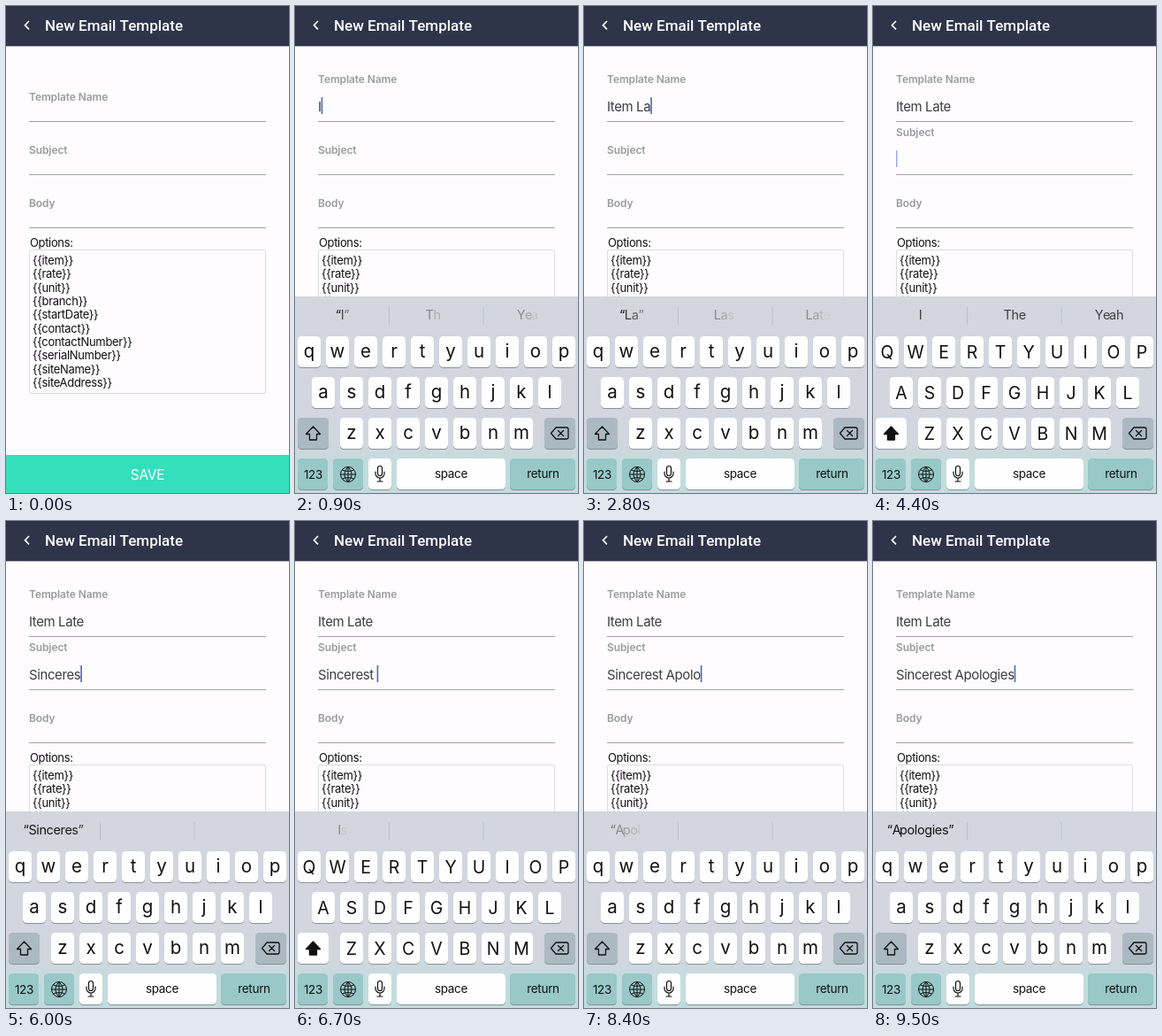
Recreate the animation shown at these times as an HTML page with a canvas. Size 320x550 px, loop 9600 ms.

```html
<!DOCTYPE html>
<html lang="en">
<head>
<meta charset="utf-8">
<title>New Email Template</title>
<style>
  html, body { margin: 0; width: 320px; height: 550px; overflow: hidden; background: #fefcfe; }
  canvas { display: block; width: 320px; height: 550px; }
</style>
</head>
<body>
<canvas id="stage"></canvas>
<script>
const LOOP = 9600, STEP = 100, KEYBOARD_TOP = 328;
const canvas = document.getElementById('stage');
const ctx = canvas.getContext('2d');
const ratio = window.devicePixelRatio || 1;
canvas.width = 320 * ratio;
canvas.height = 550 * ratio;

const fields = [
  { label: 'Template Name', y: 130, focus: 200, text: 'Item Late',
    keys: [800, 1100, 1400, 1770, 2000, 2500, 2700, 2900, 3200] },
  { label: 'Subject', y: 190, focus: 3900, text: 'Sincerest Apologies',
    keys: [4600, 4800, 5000, 5200, 5300, 5500, 5600, 5800, 6200, 6700,
           7410, 7800, 8000, 8200, 8400, 8600, 8700, 8900, 9100] },
  { label: 'Body', y: 250, focus: Infinity, text: '', keys: [] }
];
const options = ['item', 'rate', 'unit', 'branch', 'startDate', 'contact',
  'contactNumber', 'serialNumber', 'siteName', 'siteAddress'];
const suggestions = {
  I: ['The', 'Yeah'], It: ['Its', 'Item'], Ite: ['Item', 'Items'], Item: ['Items', 'Itemised'],
  L: ['Love', 'Like'], La: ['Last', 'Later'], Lat: ['Late', 'Later'], Late: ['Later', 'Latest'],
  S: ['So', 'See'], Si: ['Since', 'Six'], Sin: ['Since', 'Sing'], Sinc: ['Since', 'Sincere'],
  Since: ['Sincere', 'Sincerely'], A: ['And', 'You'], Ap: ['App', 'Apr']
};
const rows = [['qwertyuiop', 16, 373], ['asdfghjkl', 32, 419], ['zxcvbnm', 64, 465]];

const clamp = v => Math.max(0, Math.min(1, v));
const easeOut = v => 1 - (1 - clamp(v)) ** 3;

function setFont(size, { weight = 400, family = 'Inter', spacing = -0.4, caps = '' } = {}) {
  ctx.font = `${caps} ${weight} ${size}px ${family}, sans-serif`;
  ctx.letterSpacing = spacing + 'px';
}

function write(str, x, y, size, color, style = {}) {
  setFont(size, style);
  ctx.textAlign = style.align || 'left';
  ctx.fillStyle = color;
  ctx.fillText(str, x, y);
}

function rect(x, y, w, h, color) {
  ctx.fillStyle = color;
  ctx.fillRect(x, y, w, h);
}

function rounded(x, y, w, h, r, color) {
  ctx.beginPath();
  ctx.roundRect(x, y, w, h, r);
  ctx.fillStyle = color;
  ctx.fill();
}

function icon(path, width, fill) {
  const shape = new Path2D(path);
  ctx.strokeStyle = ctx.fillStyle = '#111';
  ctx.lineWidth = width;
  ctx.lineJoin = ctx.lineCap = 'round';
  if (fill) ctx.fill(shape);
  ctx.stroke(shape);
}

function key(x, y, w, color) {
  rounded(x, y + 1, w, 35, 4.5, '#8b9097');
  rounded(x, y, w, 35, 4.5, color);
}

function drawHeader() {
  rect(0, 0, 320, 45, '#2e344a');
  rect(0, 45, 320, 1, '#a9abb5');
  ctx.strokeStyle = '#fff';
  ctx.lineWidth = 1.7;
  ctx.lineCap = 'butt';
  ctx.stroke(new Path2D('M26 17 L21.5 21.7 L26 26.4'));
  write('New Email Template', 44, 28, 17, '#fff', { weight: 500, family: 'Roboto', spacing: 0 });
}

function drawField(field, t, active, typed, idle) {
  const lift = 20 * easeOut((t - field.focus) / 250);
  write(field.label, 26, field.y - 23 - lift, 12, '#9a9a9c', { weight: 600, spacing: -0.1 });
  rect(26, field.y, 268, 1, '#a3a3a5');
  write(typed, 26, field.y - 11, 15, '#3d3d3f');
  if (!active) return;
  const blink = idle < 400 ? 1 : clamp(0.5 + 2.5 * Math.cos((idle - 250) * Math.PI / 500));
  ctx.globalAlpha = blink;
  rect(26 + ctx.measureText(typed).width, field.y - 27, 1.6, 19, '#4468cc');
  ctx.globalAlpha = 1;
}

function drawOptions() {
  write('Options:', 27, 272, 13, '#111', { spacing: -0.35 });
  rounded(26, 275, 268, 163, 3, '#dcdcde');
  rounded(27, 276, 266, 161, 2, '#fefcfe');
  options.forEach((name, i) =>
    write(`{{${name}}}`, 30, 292 + i * 15.35, 13, '#111', { spacing: -0.3 }));
}

function drawSave() {
  rect(0, 507, 320, 43, '#34dfbd');
  write('SAVE', 160, 534.5, 15.5, '#fff', { align: 'center', spacing: -0.3 });
}

// Letters of a new suggestion fade in from left to right.
function drawSuggestions(word, idle, caps, afterSpace) {
  const small = caps && word ? 'small-caps' : '';
  const words = word
    ? [`“${small ? word.toLowerCase() : word}”`, ...(suggestions[word] || [])]
    : afterSpace ? ['Is', 'And', 'For'] : ['I', 'The', 'Yeah'];
  words.forEach((str, k) => {
    setFont(14.5, { caps: small });
    const left = 53.5 + k * 106.7 - ctx.measureText(str).width / 2;
    [...str].forEach((letter, i) => {
      const x = left + ctx.measureText(str.slice(0, i)).width;
      ctx.globalAlpha = clamp(idle / 200 + (k ? 0 : 0.5) - 0.75 * i / str.length);
      write(letter, x, 354, 14.5, word && !k ? '#151515' : '#3c3e43', { caps: small });
    });
  });
  ctx.globalAlpha = 1;
  rect(106, 340, 1, 20, '#bcbfc7');
  rect(212.5, 340, 1, 20, '#bcbfc7');
}

function drawKeys(caps, spaceDown) {
  for (const [letters, x, y] of rows) {
    [...letters].forEach((letter, i) => {
      const cx = x + i * 32;
      key(cx - 13, y, 26, '#fefefe');
      write(caps ? letter.toUpperCase() : letter, cx, y + (caps ? 25 : 23.5),
        caps ? 19.5 : 20.5, '#111', { align: 'center', spacing: 0 });
    });
  }
  const gray = '#abb9c2', teal = '#98c8c8';
  key(3, 465, 35, caps ? '#fefefe' : gray);
  icon('M20.5 475 L28.5 483.5 H24.5 V490 H16.5 V483.5 H12.5 Z', 1.3, caps);
  key(282, 465, 35, gray);
  icon('M295 476 H307 Q309 476 309 478 V487 Q309 489 307 489 H295 L289.5 482.5 Z' +
    'M297.5 479.5 L303.5 485.5 M303.5 479.5 L297.5 485.5', 1.3);

  key(3, 511, 34, teal);
  key(43, 511, 34, teal);
  icon('M51.5 529 a8.5 8.5 0 1 0 17 0 a8.5 8.5 0 1 0 -17 0 H68.5 M60 520.5 V537.5' +
    'M60 520.5 Q51.5 529 60 537.5 Q68.5 529 60 520.5 M53.5 524 Q60 527 66.5 524' +
    'M53.5 534 Q60 531 66.5 534', 1);
  key(83, 511, 26, '#fefefe');
  icon('M93.5 522 a2.5 2.5 0 0 1 5 0 V528 a2.5 2.5 0 0 1 -5 0 Z' +
    'M91 526 V528 a5 5 0 0 0 10 0 V526 M96 533 V537 M93 537 H99', 1.2);
  key(115, 511, 123, spaceDown ? teal : '#fefefe');
  key(243, 511, 74, teal);
  const label = { align: 'center', spacing: -0.3 };
  write('123', 20.5, 533.5, 13.5, '#111', label);
  write('space', 176.5, 532.5, 13.5, '#111', label);
  write('return', 280.5, 532.5, 13.5, '#111', label);
}

function drawKeyboard(t, typed, idle, spaceDown) {
  const rise = easeOut((t - 150) / 400);
  if (!rise) return;
  const word = typed.split(' ').pop();
  const caps = !word || (word.length === 1 && idle < 100);
  ctx.save();
  ctx.translate(0, (1 - rise) * (550 - KEYBOARD_TOP));
  const back = ctx.createLinearGradient(0, 490, 0, 522);
  back.addColorStop(0, '#d3d6de');
  back.addColorStop(1, '#c2dcde');
  rect(0, KEYBOARD_TOP, 320, 222, back);
  drawSuggestions(word, idle, caps, typed.endsWith(' '));
  drawKeys(caps, spaceDown);
  ctx.restore();
}

function draw(t) {
  ctx.setTransform(ratio, 0, 0, ratio, 0, 0);
  rect(0, 0, 320, 550, '#fefcfe');
  drawHeader();
  drawOptions();
  drawSave();

  const current = fields.findLast(field => t >= field.focus);
  let typed = '', idle = 0, spaceDown = false;
  for (const field of fields) {
    const count = field.keys.filter(time => time <= t).length;
    const value = field.text.slice(0, count);
    if (field === current) {
      typed = value;
      idle = t - (count ? field.keys[count - 1] : field.focus);
      spaceDown = field.text[count] === ' ' && field.keys[count] - t <= STEP;
    }
    drawField(field, t, field === current, value, idle);
  }
  drawKeyboard(t, typed, idle, spaceDown);
}

function tick() {
  draw(Math.floor(performance.now() % LOOP / STEP) * STEP);
  requestAnimationFrame(tick);
}
tick();
</script>
</body>
</html>
```
